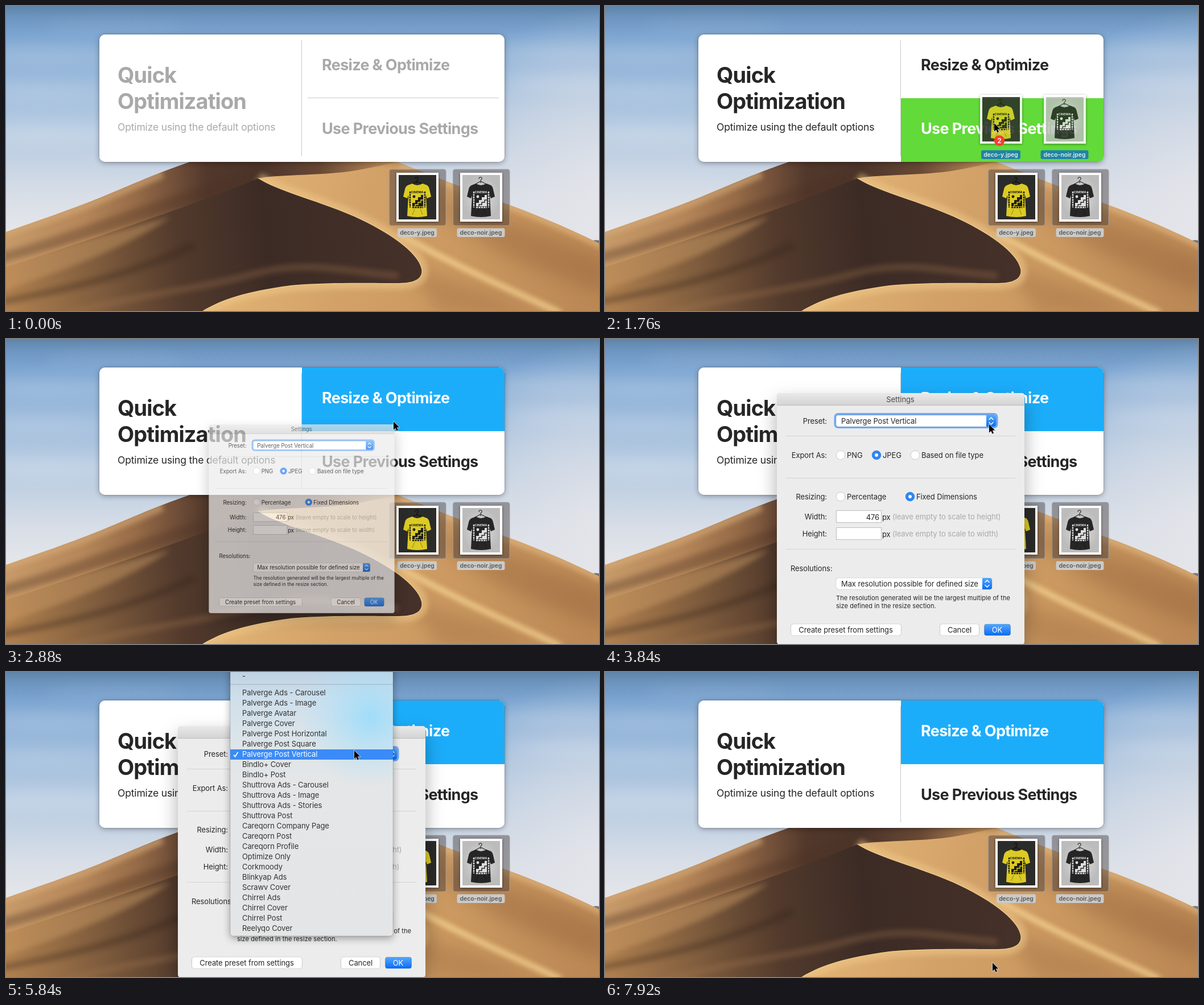
These frames come from a looping animation (1042x536 px, 8000 ms). An HTML page:

```html
<!DOCTYPE html>
<html lang="en">
<head>
<meta charset="utf-8">
<title>Drop files to optimize</title>
<style>
  html, body { margin: 0; width: 100%; height: 100%; overflow: hidden; background: #7ba4d0; }
  svg { display: block; position: absolute; left: 0; top: 0; }
  text { font-family: Inter, Roboto, sans-serif; white-space: pre; }
  .soft { filter: blur(5px); }
  .haze { filter: blur(14px); }
  .panel-shadow { filter: drop-shadow(0 2px 5px rgba(0, 0, 0, .32)); }
  .window-shadow { filter: drop-shadow(0 15px 16px rgba(0, 0, 0, .32)); }
  .menu-shadow { filter: drop-shadow(0 4px 7px rgba(0, 0, 0, .35)); }
  .photo-shadow { filter: drop-shadow(0 1px 2px rgba(0, 0, 0, .45)); }
  .control-shadow { filter: drop-shadow(0 .5px .6px rgba(0, 0, 0, .35)); }
</style>
</head>
<body>
<svg id="stage" width="1042" height="536" viewBox="0 0 1042 536">
  <defs>
    <linearGradient id="sky" x2="0" y2="1">
      <stop offset="0" stop-color="#5f84a8"/><stop offset=".035" stop-color="#6c94be"/>
      <stop offset=".09" stop-color="#7ba4d0"/><stop offset=".2" stop-color="#94b5d9"/>
      <stop offset=".35" stop-color="#adc5df"/><stop offset=".5" stop-color="#c3d2e3"/>
      <stop offset=".62" stop-color="#d8dee7"/><stop offset=".75" stop-color="#e6e7ea"/>
    </linearGradient>
    <radialGradient id="mist" gradientUnits="userSpaceOnUse" cx="1060" cy="330" r="330">
      <stop offset="0" stop-color="#e6e6ea" stop-opacity=".9"/>
      <stop offset=".5" stop-color="#dfe1e8" stop-opacity=".55"/>
      <stop offset="1" stop-color="#dfe1e8" stop-opacity="0"/>
    </radialGradient>
    <linearGradient id="ridge" gradientUnits="userSpaceOnUse" x1="0" x2="1042" y1="0" y2="0">
      <stop offset="0" stop-color="#c79a69"/><stop offset=".13" stop-color="#b58659"/>
      <stop offset=".22" stop-color="#966b47"/><stop offset=".28" stop-color="#74513a"/>
      <stop offset=".34" stop-color="#51382b"/><stop offset=".43" stop-color="#4b3429"/>
      <stop offset=".53" stop-color="#684834"/><stop offset=".64" stop-color="#b98a58"/>
      <stop offset="1" stop-color="#c6945e"/>
    </linearGradient>
    <linearGradient id="sand" gradientUnits="userSpaceOnUse" x1="443" x2="1042" y1="300" y2="470">
      <stop offset="0" stop-color="#e0b273"/><stop offset=".3" stop-color="#d3a269"/>
      <stop offset=".6" stop-color="#ca9860"/><stop offset="1" stop-color="#bb8855"/>
    </linearGradient>
    <linearGradient id="shade" gradientUnits="userSpaceOnUse" x1="0" x2="730" y1="500" y2="420">
      <stop offset="0" stop-color="#b0804f"/><stop offset=".2" stop-color="#84603f"/>
      <stop offset=".42" stop-color="#523a2c"/><stop offset=".63" stop-color="#3c2b25"/>
      <stop offset="1" stop-color="#453129"/>
    </linearGradient>
    <linearGradient id="titlebar" x2="0" y2="1">
      <stop offset="0" stop-color="#e9e9e9"/><stop offset="1" stop-color="#d3d3d3"/>
    </linearGradient>
    <linearGradient id="blue" x2="0" y2="1">
      <stop offset="0" stop-color="#55a8fb"/><stop offset="1" stop-color="#0a6cf6"/>
    </linearGradient>
    <linearGradient id="pressed" x2="0" y2="1">
      <stop offset="0" stop-color="#2f7fe0"/><stop offset="1" stop-color="#0552c4"/>
    </linearGradient>
    <linearGradient id="menuFill" gradientUnits="userSpaceOnUse" x1="0" x2="0" y1="0" y2="464">
      <stop offset="0" stop-color="#bfd2e3"/><stop offset=".1" stop-color="#cfdfeb"/>
      <stop offset=".27" stop-color="#dde5ea"/><stop offset=".42" stop-color="#e5e6e7"/>
      <stop offset="1" stop-color="#e4e5e6"/>
    </linearGradient>
    <radialGradient id="menuGlow" gradientUnits="userSpaceOnUse" cx="640" cy="80" r="125">
      <stop offset="0" stop-color="#9adcfb" stop-opacity=".9"/>
      <stop offset="1" stop-color="#b4e2f8" stop-opacity="0"/>
    </radialGradient>
    <radialGradient id="studio">
      <stop offset="0" stop-color="#dedede"/><stop offset="1" stop-color="#bcbcbc"/>
    </radialGradient>
    <clipPath id="duneClip">
      <path id="dune" d="M0 397C60 376 110 359 165 337C230 310 270 292 320 275L500 205L690 275C760 303 830 330 885 350C940 370 1000 396 1042 417V536H0Z"/>
    </clipPath>
    <clipPath id="panelClip"><rect x="164" y="50" width="712" height="224" rx="10"/></clipPath>
    <path id="edge" d="M443 303C482 327 545 341 612 370C672 397 724 433 730 462C733 478 720 487 690 487C640 487 560 485 500 491C420 502 380 515 345 536"/>
  </defs>

  <rect width="1042" height="536" fill="url(#sky)"/>
  <rect width="1042" height="536" fill="url(#mist)"/>
  <g class="haze" fill="#fff" opacity=".2">
    <ellipse cx="70" cy="85" rx="130" ry="12"/><ellipse cx="190" cy="35" rx="120" ry="5"/>
    <ellipse cx="60" cy="150" rx="120" ry="10"/><ellipse cx="70" cy="225" rx="130" ry="16"/>
    <ellipse cx="960" cy="80" rx="110" ry="12"/><ellipse cx="980" cy="135" rx="100" ry="10"/>
  </g>
  <path d="M1026 414Q1034 410 1042 412V420H1026Z" fill="#73777d"/>
  <use href="#dune" fill="url(#ridge)"/>
  <g clip-path="url(#duneClip)">
    <path class="soft" d="M-10 402C60 380 110 363 165 341C220 318 250 305 275 295" fill="none" stroke="#d9ad7a" stroke-width="14" opacity=".6"/>
    <path class="soft" d="M-20 447C120 413 260 345 440 306" fill="none" stroke="#4d3325" stroke-width="22" opacity=".35"/>
    <path d="M443 303C480 295 560 299 620 288C660 281 690 272 720 268L1042 400V536H345Z" fill="url(#sand)"/>
    <path class="haze" d="M740 335C820 350 980 410 1060 450L1050 505C930 470 800 410 740 335Z" fill="#80502f" opacity=".28"/>
    <path class="soft" d="M690 400C790 458 890 500 975 540" fill="none" stroke="#f8d694" stroke-width="10" opacity=".8"/>
    <path class="haze" d="M700 450C800 490 870 510 920 540H760Z" fill="#946239" opacity=".3"/>
    <path class="soft" d="M690 277C760 305 830 332 885 352C940 372 1000 398 1052 423" fill="none" stroke="#e0b57e" stroke-width="13" opacity=".7"/>
    <use class="soft" href="#edge" fill="none" stroke="#efc88a" stroke-width="22" opacity=".55"/>
    <use href="#edge" fill="none" stroke="#f3cd8b" stroke-width="3" opacity=".7"/>
    <path d="M443 303C330 350 150 410 -10 462V536H345C380 515 420 502 500 491C560 485 640 487 690 487C720 487 733 478 730 462C724 433 672 397 612 370C545 341 482 327 443 303Z" fill="url(#shade)"/>
    <path class="soft" d="M-10 450C90 425 200 395 290 370C220 420 110 462 -10 502Z" fill="#cf9e67" opacity=".45"/>
    <g class="soft" fill="none" stroke-width="12" opacity=".32">
      <path d="M-10 520C100 500 230 470 330 420" stroke="#2e2018"/>
      <path d="M110 540C240 505 330 500 430 472S600 468 690 474" stroke="#a37750"/>
    </g>
  </g>
</svg>

<script>
const NS = "http://www.w3.org/2000/svg";
const stage = document.getElementById("stage");

function add(parent, tag, attrs = {}) {
  const el = document.createElementNS(NS, tag);
  for (const key in attrs) el.setAttribute(key, attrs[key]);
  return parent.appendChild(el);
}
const group = (parent, attrs) => add(parent, "g", attrs);
const rect = (parent, x, y, width, height, fill, more) =>
  add(parent, "rect", { x, y, width, height, fill, ...more });
const path = (parent, d, more) => add(parent, "path", { d, fill: "none", ...more });

// y is the middle of the capitals
function text(parent, str, x, y, size, fill, more) {
  const el = add(parent, "text", { x, y: y + size * .364, "font-size": size, fill, ...more });
  el.textContent = str;
  return el;
}
const show = (el, on) => { el.style.display = on ? "" : "none"; };

// ---- Drop panel
const panel = group(stage);
rect(panel, 164, 50, 712, 224, "#fff", { rx: 10, class: "panel-shadow", stroke: "#0004", "stroke-width": 1 });
rect(panel, 164, 50, 712, 224, "#fff", { rx: 10 });
rect(panel, 519, 60, 1, 204, "#cbcbcb");
const midLine = rect(panel, 530, 161, 336, 1, "#cbcbcb");
const tiles = group(panel, { "clip-path": "url(#panelClip)" });
const blueTile = rect(tiles, 520, 50, 356, 112, "#1cadfa");
const greenTile = rect(tiles, 520, 162, 356, 112, "#62da39");
const bold = (size) => ({ "font-weight": 700, "letter-spacing": -.025 * size });
const quickText = [
  text(panel, "Quick", 196, 121.5, 38, "", bold(38)),
  text(panel, "Optimization", 196, 167.5, 38, "", bold(38)),
  text(panel, "Optimize using the default options", 196, 213, 17.6, "", { "letter-spacing": -.21 }),
];
const resizeText = text(panel, "Resize & Optimize", 555, 103, 27, "", bold(27));
const previousText = text(panel, "Use Previous Settings", 555, 215, 27, "", bold(27));

// ---- Files
const files = [
  { name: "deco-y.jpeg", x: 673, wall: "#2b2b2a", shirt: "#dccb24", print: "#1f1e17", hook: "#111" },
  { name: "deco-noir.jpeg", x: 785, wall: "url(#studio)", shirt: "#262626", print: "#dedede", hook: "#333" },
];

function photo(parent, f) {
  const g = group(parent, { transform: `translate(${f.x} 286)` });
  rect(g, 13, 7, 74, 86, "#fff", { class: "photo-shadow" });
  rect(g, 17, 11, 66, 78, f.wall);
  path(g, "M49 25V20Q53 18 50 15Q46 14 46 18M38 28L49 22L61 28", { stroke: f.hook, "stroke-width": 1.2 });
  path(g, "M41 26Q49 32 59 26L67 29Q70 31 71 36L74 49L67 52L65 47L67 83Q50 87 32 83L34 47L32 52L25 49L28 36Q29 31 33 29Z", { fill: f.shirt });
  path(g, "M34 47L37 66M65 47L62 66M41 81L45 71M59 81L55 71", { stroke: "#0004", "stroke-width": 1.2 });
  text(g, "CINEMA", 49.5, 41.5, 5.4, f.print, { "text-anchor": "middle", "font-weight": 700 });
  path(g, "M41 66V60H46V55H51V50H56V46H60V66Z", { fill: f.print });
  path(g, "M46 66V63H51V59H56V55H60", { stroke: f.shirt, "stroke-width": 1.4 });
  add(g, "circle", { cx: 44, cy: 49, r: 2.4, fill: f.print });
  path(g, "M37 40V68M63 40V68M41 68H60", { stroke: f.print, "stroke-width": 2.4, "stroke-dasharray": "3.2 1.2" });
}

function fileLabel(parent, f, back, ink) {
  const half = f.name.length * 2.52 + 6.7;
  const cx = f.x + 49.5;
  rect(parent, cx - half, 390.5, half * 2, 15.5, back, { rx: 3 });
  text(parent, f.name, cx, 398.3, 10.4, ink, { "text-anchor": "middle", "font-weight": 600 });
}

for (const f of files) {
  rect(stage, f.x + .5, 287, 99.5, 99, "#3c34346e", { rx: 4, stroke: "#a0a0a0a0", "stroke-width": 1.5 });
  photo(stage, f);
  fileLabel(stage, f, "#cbcac8", "#585858");
}

// ---- Settings dialog
const dialog = group(stage);
rect(dialog, 302, 95, 435, 442, "#ececec", { rx: 5, class: "window-shadow" });
path(dialog, "M302 117V100Q302 95 307 95H732Q737 95 737 100V117Z", { fill: "url(#titlebar)" });
rect(dialog, 302, 116, 435, 1, "#bcbcbc");

const ink = "#262626", grey = "#a9a9a9";
const label = (parent, str, x, y, fill = ink, anchor = "start") =>
  text(parent, str, x, y, 13, fill, { "letter-spacing": -.1, "text-anchor": anchor });

label(dialog, "Settings", 519, 106.5, "#4a4a4a", "middle");
for (const y of [170, 244, 369]) rect(dialog, 318, y, 403, 1, "#d2d2d2");
for (const [str, y] of [["Preset:", 144.5], ["Export As:", 204.5], ["Resizing:", 277.5], ["Width:", 312.5], ["Height:", 342.5]])
  label(dialog, str, 390, y, ink, "end");
label(dialog, "Resolutions:", 326, 403.5);

function button(x, y, width, fill = "#fff") {
  return rect(dialog, x, y, width, 20, fill, { rx: 4, class: "control-shadow", stroke: "#0003", "stroke-width": .5 });
}
function select(str, y, width) {
  const right = 406 + width;
  button(406, y, width);
  path(dialog, `M${right - 17} ${y}H${right - 4}Q${right} ${y} ${right} ${y + 4}V${y + 16}Q${right} ${y + 20} ${right - 4} ${y + 20}H${right - 17}Z`, { fill: "url(#blue)" });
  path(dialog, `M${right - 12} ${y + 7.5}l3.5 -3.5l3.5 3.5m-7 5l3.5 3.5l3.5 -3.5`, { stroke: "#fff", "stroke-width": 1.5, "stroke-linecap": "round" });
  label(dialog, str, 415, y + 10.5);
}
function radio(str, x, y, on) {
  add(dialog, "circle", { cx: x, cy: y, r: 7.8, fill: on ? "#2e86f7" : "#fff", stroke: on ? "#2173e0" : "#b9b9b9", "stroke-width": .7 });
  if (on) add(dialog, "circle", { cx: x, cy: y, r: 2.9, fill: "#fff" });
  label(dialog, str, x + 11, y + .5);
}
function field(y, value, hint) {
  rect(dialog, 406.5, y - 11, 79, 21, "#fff", { stroke: "#bdbdbd", "stroke-width": 1 });
  label(dialog, value, 482, y + .5, ink, "end");
  label(dialog, "px", 487, y + .5);
  label(dialog, hint, 505, y, grey);
}

const ring = rect(dialog, 404.5, 132, 284, 23, "#fff", { rx: 5, stroke: "#71a9f3", "stroke-width": 4 });
select("Palverge Post Vertical", 134, 281);
radio("PNG", 414, 204);
radio("JPEG", 477, 204, true);
radio("Based on file type", 545, 204);
radio("Percentage", 414, 277);
radio("Fixed Dimensions", 536, 277, true);
field(312.5, "476", "(leave empty to scale to height)");
field(342.5, "", "(leave empty to scale to width)");
select("Max resolution possible for defined size", 420, 274);
const note = { "letter-spacing": .06 };
text(dialog, "The resolution generated will be the largest multiple of the", 406, 455, 11, ink, note);
text(dialog, "size defined in the resize section.", 406, 469, 11, ink, note);
button(326.5, 501, 194);
label(dialog, "Create preset from settings", 423, 511, ink, "middle");
button(588.5, 501, 69);
label(dialog, "Cancel", 623, 511, ink, "middle");
const okButton = button(666.5, 501, 46);
label(dialog, "OK", 689, 511, "#fff", "middle");

// ---- Preset menu
const presets = [
  "Palverge Ads - Carousel", "Palverge Ads - Image", "Palverge Avatar", "Palverge Cover",
  "Palverge Post Horizontal", "Palverge Post Square", "Palverge Post Vertical",
  "Bindlo+ Cover", "Bindlo+ Post",
  "Shuttrova Ads - Carousel", "Shuttrova Ads - Image", "Shuttrova Ads - Stories", "Shuttrova Post",
  "Careqorn Company Page", "Careqorn Post", "Careqorn Profile", "Optimize Only",
  "Corkmoody", "Blinkyap Ads", "Scrawv Cover",
  "Chirrel Ads", "Chirrel Cover", "Chirrel Post", "Reelyqo Cover",
];
const CHOSEN = 6;
const menu = group(stage);
rect(menu, 394, -20, 286, 484, "url(#menuFill)", { rx: 5, class: "menu-shadow", stroke: "#0003", "stroke-width": .8 });
rect(menu, 394, -20, 286, 484, "url(#menuGlow)", { rx: 5 });
label(menu, "-", 415, 7);
rect(menu, 394, 21, 286, 1.5, "#0000001f");
const highlight = rect(menu, 394, 136, 286, 18, "#3a8bf7");
const rows = presets.map((name, i) => label(menu, name, 415, 36.5 + 18 * i, "#333"));
const check = path(menu, "M400 145.5l2.6 3.3l5 -8", { "stroke-width": 1.7 });

// ---- Dragged copies and pointer
const ghost = group(stage, { opacity: .86 });
for (const f of files) {
  photo(ghost, f);
  fileLabel(ghost, f, "#0e69cee6", "#f2f8ee");
}
const pointer = group(stage);
const badge = group(pointer);
add(badge, "circle", { cx: 9, cy: 30.5, r: 9.3, fill: "#fb3b30" });
text(badge, "2", 9, 30.5, 12, "#fff", { "text-anchor": "middle", "font-weight": 600 });
path(pointer, "M0 0V14.5L3.3 11.4L5.6 16.6L8 15.6L5.8 10.6H10.3Z", {
  fill: "#000", stroke: "#fff", "stroke-width": 1.2, "paint-order": "stroke", class: "control-shadow",
});

// ---- Motion
const LOOP = 8000, STEP = 80;
const GRAB = [711, 343];
const route = [ // time, x, y
  [320, 1030, 488], [480, 880, 420], [640, 770, 372], [880, ...GRAB],
  [1360, ...GRAB], [1520, 703, 306], [1760, 684, 206], [2000, 681, 145],
  [3760, 681, 145], [3840, 675, 150], [4000, 675, 148], [4320, 612, 138],
  [6480, 612, 138], [6560, 617, 160], [6800, 669, 366], [7120, 681, 470], [7360, 681, 511],
];
const within = (t, from, to) => t >= from && t < to;

function pointerAt(t) {
  const next = route.findIndex((key) => key[0] > t);
  if (next < 0) return route[route.length - 1].slice(1);
  if (next === 0) return route[0].slice(1);
  const a = route[next - 1], b = route[next];
  const p = (t - a[0]) / (b[0] - a[0]);
  return [a[1] + (b[1] - a[1]) * p, a[2] + (b[2] - a[2]) * p];
}

function drawPanel(t, y) {
  const awake = t >= 1440;
  const blue = awake && (t >= 2080 || y < 162);
  const green = awake && !blue && y < 274;
  const idle = awake ? "#262626" : "#a9a9a9";
  show(blueTile, blue);
  show(greenTile, green);
  show(midLine, !blue && !green);
  for (const el of quickText) el.setAttribute("fill", idle);
  resizeText.setAttribute("fill", blue ? "#fff" : idle);
  previousText.setAttribute("fill", green ? "#fff" : idle);
}

function drawDialog(t) {
  const grow = Math.max(0, Math.min(1, (t - 2720 + STEP) / 320));
  show(dialog, within(t, 2720, 7920));
  dialog.setAttribute("transform", `translate(519.5 316) scale(${grow}) translate(-519.5 -316)`);
  dialog.setAttribute("opacity", t >= 7840 ? .5 : grow ** 1.2);
  show(ring, t < 6160);
  okButton.setAttribute("fill", t >= 7440 ? "url(#pressed)" : "url(#blue)");
}

function drawMenu(t) {
  const lit = !within(t, 6000, 6080);
  show(menu, within(t, 4080, 6320));
  menu.setAttribute("opacity", t < 6160 ? 1 : Math.max(0, (6320 - t) / 240));
  show(highlight, lit);
  rows[CHOSEN].setAttribute("fill", lit ? "#fff" : "#333");
  check.setAttribute("stroke", lit ? "#fff" : "#333");
}

function draw(t) {
  const [x, y] = pointerAt(t);
  const dragging = within(t, 1440, 2080);
  drawPanel(t, y);
  drawDialog(t);
  drawMenu(t);
  show(ghost, dragging);
  show(badge, dragging);
  show(pointer, t >= 320);
  ghost.setAttribute("transform", `translate(${x - GRAB[0]} ${y - GRAB[1]})`);
  pointer.setAttribute("transform", `translate(${x} ${y})`);
}

const start = performance.now();
function tick() {
  const t = (performance.now() - start) % LOOP;
  draw(Math.floor(t / STEP) * STEP);
  requestAnimationFrame(tick);
}
tick();
</script>
</body>
</html>
```
